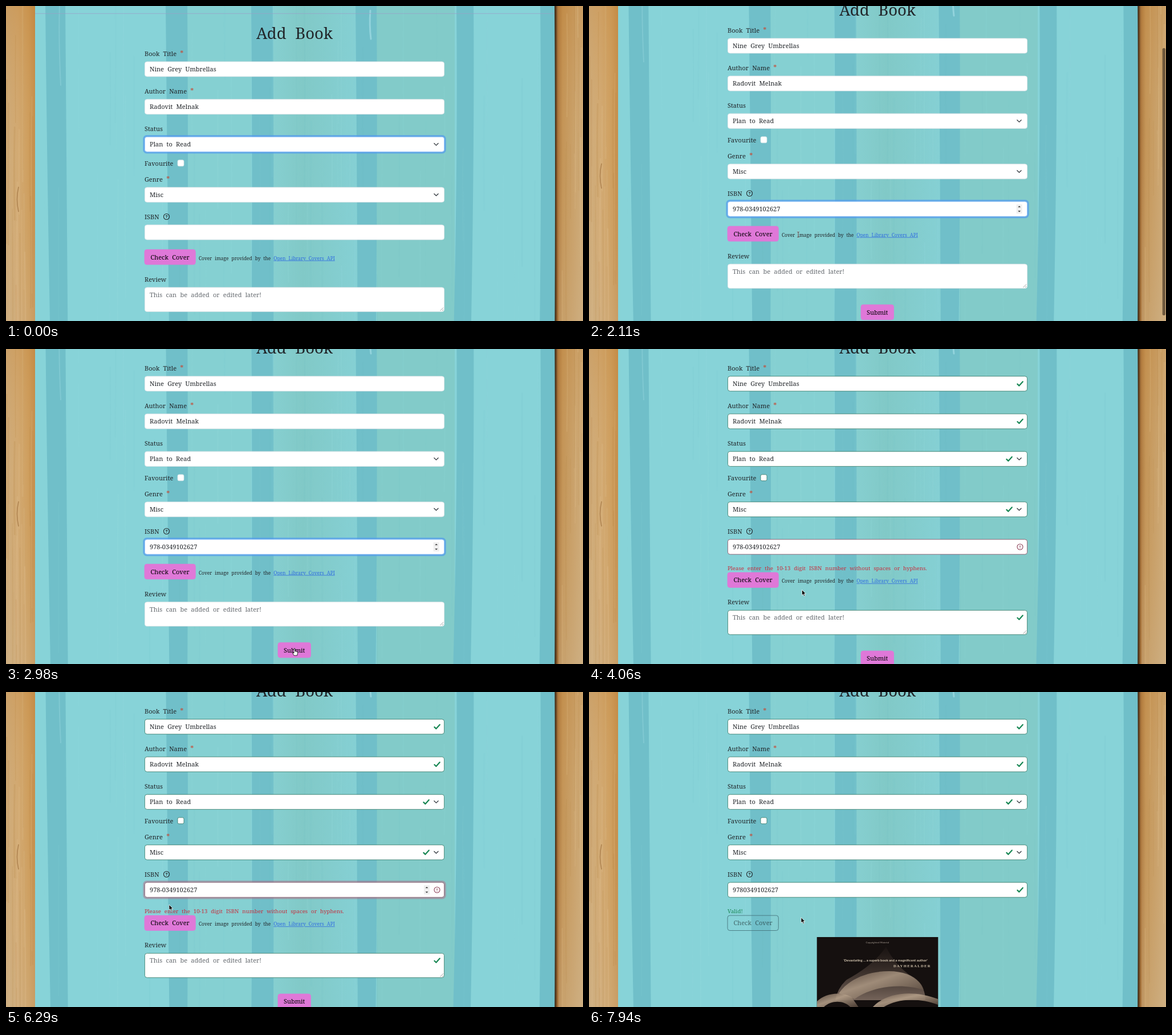
Animation of 1012x554 px, one loop 8000 ms. Source, as an HTML page:

```html
<!DOCTYPE html>
<html lang="en">
<head>
<meta charset="utf-8">
<title>Add Book</title>
<style>
  html, body { margin: 0; height: 100%; overflow: hidden; }
  svg { display: block; width: 100vw; height: 100vh; }
  text { font: 11px "Noto Serif", serif; word-spacing: .31em; fill: #212529; white-space: pre; }
  .title { font-size: 27.5px; }
  .button { font-weight: 500; fill: #000; }
  .message { font-size: 9.66px; word-spacing: .35em; }
  .caption { font-size: 8.36px; word-spacing: .35em; }
  .middle { text-anchor: middle; }
</style>
</head>
<body>
<svg viewBox="0 0 1012 554" xmlns="http://www.w3.org/2000/svg">
  <defs>
    <linearGradient id="woodLeft">
      <stop offset="0" stop-color="#cfae7e"/><stop offset=".4" stop-color="#d3ab74"/>
      <stop offset=".75" stop-color="#cf9f5e"/><stop offset="1" stop-color="#c48c48"/>
    </linearGradient>
    <linearGradient id="woodRight">
      <stop offset="0" stop-color="#2b1a0e"/><stop offset=".06" stop-color="#553619"/>
      <stop offset=".13" stop-color="#a8733a"/><stop offset=".3" stop-color="#c39456"/>
      <stop offset="1" stop-color="#cfae7e"/>
    </linearGradient>
    <linearGradient id="woodLight" x2="0" y2="1">
      <stop offset="0" stop-color="#c07e30" stop-opacity=".35"/>
      <stop offset=".4" stop-color="#cda066" stop-opacity=".1"/>
      <stop offset="1" stop-color="#cdb48e" stop-opacity=".5"/>
    </linearGradient>
    <linearGradient id="panel">
      <stop offset="0" stop-color="#86cfd0"/><stop offset=".35" stop-color="#81c9c7"/>
      <stop offset="1" stop-color="#85d0d4"/>
    </linearGradient>
    <linearGradient id="beam" x2="0" y2="1">
      <stop offset="0" stop-color="#4a3b33" stop-opacity=".1"/><stop offset="1" stop-color="#75645a"/>
    </linearGradient>
    <linearGradient id="fold" x2="1" y2="1">
      <stop offset="0" stop-color="#5c4b40"/><stop offset=".4" stop-color="#b39e88"/>
      <stop offset="1" stop-color="#46382f"/>
    </linearGradient>
  </defs>
  <g id="backdrop"></g>
  <g id="form"></g>
  <g id="overlay"></g>
</svg>
<script>
const LOOP = 8000;
const LEFT = 243, WIDTH = 526, ROW = 27;
const GREEN = '#198754', PINK = '#df78d8';
const [backdrop, form, overlay] = ['backdrop', 'form', 'overlay'].map(id => document.getElementById(id));

const text = (x, y, content, attrs = '') => `<text x="${x}" y="${y}" ${attrs}>${content}</text>`;
const rect = (x, y, w, h, attrs) => `<rect x="${x}" y="${y}" width="${w}" height="${h}" ${attrs}/>`;
const path = (d, attrs) => `<path d="${d}" ${attrs}/>`;
const line = (d, color, width, extra = '') =>
  path(d, `fill="none" stroke="${color}" stroke-width="${width}" ${extra}`);
const at = (x, y, content) => `<g transform="translate(${x} ${y})">${content}</g>`;
const within = (t, ...spans) => spans.some(([from, to]) => t >= from && t < to);

// Keys are [time, ...values]; values are interpolated linearly or held.
function track(t, keys) {
  const next = keys.findIndex(key => key[0] > t);
  if (next < 1) return keys.at(next ? -1 : 0).slice(1);
  const a = keys[next - 1], b = keys[next], k = (t - a[0]) / (b[0] - a[0]);
  return a.slice(1).map((v, i) => v + (b[i + 1] - v) * k);
}
const ramp = (t, ...keys) => track(t, keys)[0];
const held = (t, ...keys) => keys.filter(key => key[0] <= t).at(-1)[1];

function random(seed) {
  return () => (seed = (seed * 16807) % 2147483647) / 2147483647;
}

function paintBackdrop() {
  const rnd = random(71);
  const streaks = (count, x, w, color, strength) => Array.from({ length: count }, () => {
    const sx = x + rnd() * w, y = rnd() * 560 - 60, h = 80 + rnd() * 320, bend = rnd() * 5 - 2.5;
    return line(`M${sx} ${y}q${bend} ${h / 2} 0 ${h}`, color, .6 + rnd() * 2.4,
      `opacity="${strength * (.4 + rnd() * .6)}" stroke-linecap="round"`);
  }).join('');
  const stripe = (a, b, c, d) =>
    path(`M${a} -5H${b}Q${b + 2} 260 ${d} 660H${c}Q${a + 3} 300 ${a} -5Z`, 'fill="#70bfc9"');
  backdrop.innerHTML =
    rect(0, -5, 52, 665, 'fill="url(#woodLeft)"') +
    rect(0, -5, 52, 665, 'fill="url(#woodLight)"') +
    streaks(12, 1, 46, '#b27c38', .2) + streaks(10, 2, 46, '#e3c596', .3) +
    line('M22 318q-5 22 0 44', '#83521f', 1.6, 'opacity=".45"') +
    rect(961, -5, 51, 665, 'fill="url(#woodRight)"') +
    rect(969, -5, 43, 665, 'fill="url(#woodLight)"') +
    streaks(9, 974, 36, '#e0c08f', .3) + streaks(6, 974, 36, '#b58649', .18) +
    rect(51, -5, 910.5, 665, 'fill="#87d3d8"') +
    rect(318, -5, 112, 665, 'fill="#85d0d2"') +
    rect(469, -5, 148, 665, 'fill="url(#panel)"') +
    rect(650, -5, 137, 665, 'fill="#82cbc9"') +
    [[69, 104, 79, 109], [280, 318, 287, 318], [430, 468, 430, 469],
     [613, 650, 617, 648], [790, 820, 783, 814], [937, 962, 935, 962]].map(s => stripe(...s)).join('') +
    streaks(40, 55, 900, '#9cdde0', .15) + streaks(25, 55, 900, '#62b3bf', .1) +
    line('M94 -5Q92 60 96 140', '#98d8de', 2, 'opacity=".4"') +
    line('M639 8q-2 25 1 50', '#a9e1ea', 3, 'opacity=".6" stroke-linecap="round"') +
    line('M51 13.2H961', '#9a9fc8', 1.1, 'opacity=".75"');
}

const check = (x, y) =>
  at(x, y, line('M-4.6 .6L-1.6 3.6L4.8 -3.6', GREEN, 2.2, 'stroke-linecap="round" stroke-linejoin="round"'));
const chevron = y =>
  at(754.5, y, line('M-3.6 -1.8L0 1.8L3.6 -1.8', '#343a40', 1.3, 'stroke-linecap="round" stroke-linejoin="round"'));
const spinner = (x, y) => at(x, y,
  rect(-5, -8, 10, 16, 'fill="#efefef"') + path('M-2.4 -3L0 -5.6L2.4 -3ZM-2.4 3L0 5.6L2.4 3Z', 'fill="#444"'));
const alertIcon = y => at(756, y,
  '<circle r="5" fill="none" stroke="#8a3d55" stroke-width="1.1"/>' +
  line('M0 -2.6V.6M0 1.7V2.8', '#8a3d55', 1.2));

const label = (y, name, required) =>
  text(LEFT, y, name + (required ? ' <tspan fill="#c9452f" font-size="12">*</tspan>' : ''));

// The border is drawn inside the box, the focus halo around it.
function box(y, h, border, glow = 0, glowColor = '#559cec', strength = .72) {
  const halo = glow > 0
    ? rect(LEFT - 1.2, y - 1.2, WIDTH + 2.4, h + 2.4,
        `rx="5" fill="none" stroke="${glowColor}" stroke-width="3" opacity="${glow * strength}"`)
    : '';
  return halo + rect(LEFT + .4, y + .4, WIDTH - .8, h - .8,
    `rx="4" fill="#fff" stroke="${border}" stroke-width=".8"`);
}

function button(x, y, w, name, fade = 0) {
  return rect(x, y, w, 26.5, `rx="4" fill="${PINK}" fill-opacity="${1 - fade}" stroke="${fade ? '#3f6b74' : PINK}" stroke-width=".8"`) +
    text(x + w / 2, y + 17.3, name, `class="button middle" opacity="${1 - fade * .5}"`);
}

function cover() {
  const fold = (d, opacity) => path(d, `fill="url(#fold)" opacity="${opacity}"`);
  return rect(399.7, 481, 212.6, 140, 'fill="#15100f"') +
    path('M521 498Q500 530 452 556Q436 570 432 592H590Q590 566 568 552Q536 530 521 498Z', 'fill="url(#beam)"') +
    fold('M438 580C456 554 490 541 526 541C560 541 582 556 587 574C550 562 500 566 466 590Z', .8) +
    fold('M400 606V594C414 580 440 576 460 586L474 606H460C450 592 424 590 410 606Z', .9) +
    fold('M496 606C518 580 564 572 612 590V600C576 586 536 590 514 606Z', .9) +
    text(506, 492, 'Copyrighted Material', 'class="middle" style="font:4.4px Lato,sans-serif;word-spacing:0;fill:#a79c92"') +
    text(520, 523.6, "'Devastating ... a superb book and a magnificent author'",
      'class="middle" style="font:bold 6px Lato,sans-serif;word-spacing:0;fill:#d6c8b2"') +
    text(534, 534.4, 'DAYHERALDER', 'style="font:bold 6.6px \'Liberation Serif\',serif;letter-spacing:1.35px;fill:#cfc0aa"');
}

function drawForm(t) {
  const submitted = t >= 3270, fixed = t >= 6490, loading = t >= 7540, loaded = t >= 7940;
  const border = submitted ? '#2f7562' : '#dee2e6';
  const shift = submitted ? 14.7 : 0;
  const lower = shift + (loading ? 24 : 0);

  const input = (y, value) =>
    box(y, ROW, border) + text(252, y + 17.5, value) + (submitted ? check(756, y + 13.5) : '');
  const select = (y, value, glow) =>
    box(y, ROW, glow > .3 ? '#86b7fe' : border, glow) + text(252, y + 17.5, value) +
    chevron(y + 13.5) + (submitted ? check(737, y + 13.5) : '');

  let out =
    text(506, 57.5, 'Add Book', 'class="title middle"') +
    label(88, 'Book Title', true) + input(97.5, 'Nine Grey Umbrellas') +
    label(154, 'Author Name', true) + input(163.7, 'Radovit Melnak') +
    label(220, 'Status') + select(229.8, 'Plan to Read', ramp(t, [800, 1], [940, 0])) +
    label(280.5, 'Favourite') +
    rect(301, 270.8, 11, 11, `rx="2.5" fill="#fff" stroke="${submitted ? '#2f7562' : '#cfe0e2'}" stroke-width=".8"`) +
    label(309, 'Genre', true) + select(318.5, 'Misc', 0) +
    label(375, 'ISBN') +
    '<circle cx="281.5" cy="370.5" r="5" fill="none" stroke="#212529" stroke-width="1.1"/>' +
    text(281.5, 373.4, '?', 'class="middle" style="font:bold 8px Roboto,sans-serif"');

  // ISBN row
  const focus = ramp(t, [1140, 0], [1320, 1], [3270, 1], [3400, 0], [5320, 0], [5500, 1], [7180, 1], [7330, 0]);
  const glowColor = !submitted ? '#559cec' : fixed ? '#3f9a78' : '#b5647f';
  const isbnBorder = !submitted ? (focus > .3 ? '#86b7fe' : border) : fixed ? border : '#8a4a5e';
  const isbn = fixed ? '9780349102627' : t >= 1420 ? '978-0349102627' : '';
  out += box(384.5, ROW, isbnBorder, focus, glowColor, submitted ? .45 : .72) + text(252, 402, isbn);
  if (submitted) out += fixed ? check(756, 398) : alertIcon(398);
  if (focus > .5 || within(t, [4560, 5320])) out += spinner(submitted ? 738 : 754.7, 398);
  if (within(t, [1230, 2010], [2500, 2980], [5320, 5790], [6000, 6290], [6490, 6980])) {
    const caret = fixed ? 270.7 : submitted ? 274.2 : t < 1420 ? 252.4 : 335.4;
    out += line(`M${caret} 391.5v13`, '#111', .9);
  }
  if (submitted) {
    out += fixed
      ? text(LEFT, 439.2, 'Valid!', `class="message" style="fill:${GREEN}"`)
      : text(LEFT, 439.2, 'Please enter the 10-13 digit ISBN number without spaces or hyphens.',
          'class="message" style="fill:#c5303f"');
  }

  out += button(LEFT, 428.3 + shift, 89.3, 'Check Cover', ramp(t, [7540, 0], [7940, 1]));
  if (!loading) {
    out += text(338, 446.6 + shift, 'Cover image provided by the ' +
      '<tspan fill="#2f6be0" text-decoration="underline">Open Library Covers API</tspan>', 'class="caption"');
  }
  if (loaded) return out + cover();

  return out + at(0, lower,
    label(484.5, 'Review') + box(494.5, 43.5, border) +
    text(252, 511.7, 'This can be added or edited later!', 'style="fill:#666b70"') +
    line('M761.5 536L767 530.5M765 536L767 534', '#777', .7) +
    (submitted ? check(756, 507.5) : '') +
    button(477, 566.3, 57.5, 'Submit'));
}

const CURSOR_PATH = [
  [80, 330, 240], [850, 345, 405], [1140, 352, 404], [1500, 367, 402], [2300, 367, 402],
  [2500, 408, 430], [2980, 506, 527], [4059, 506, 527], [4060, 374, 424], [4160, 318, 377],
  [4460, 318, 377], [4560, 295, 364], [5220, 283, 350], [5320, 275, 348], [5700, 275, 348],
  [6000, 286, 374], [7080, 286, 374], [7180, 300, 402], [7540, 300, 402], [7640, 372, 396.5]
];

function cursor(t) {
  if (t < 80) return '';
  const [x, y] = track(t, CURSOR_PATH);
  const inField = t > 4000 && y > 334 && y < 362;
  const beam = 'M-1.8 -4.8Q0 -4.8 0 -3.6Q0 -4.8 1.8 -4.8M0 -3.6V3.6M-1.8 4.8Q0 4.8 0 3.6Q0 4.8 1.8 4.8';
  if (inField || within(t, [760, 2450])) {
    return at(x, y, line(beam, '#fff', 1.8, 'opacity=".7"') + line(beam, '#222', .9));
  }
  const onButton = within(t, [2900, 4060]) || (t > 7000 && x < 332 && y > 393);
  const shape = onButton
    ? 'M-1 0Q0 -1 1 0V4.5L5 5.5Q6 6 5.6 8L4.6 12H-.8L-3.6 7.8Q-3.6 6.4 -1 8Z'
    : 'M0 0V9.6L2.2 7.6L3.8 11.2L5.4 10.5L3.9 7H6.9Z';
  return at(x, y, path(shape, `fill="${onButton ? '#fff' : '#000'}" stroke="${onButton ? '#000' : '#fff'}" stroke-width=".8"`));
}

function drawOverlay(t, scroll) {
  const bar = t < 2010 ? 0 : ramp(t, [2700, .85], [2980, 0]);
  return (scroll > 50 ? rect(0, 604 - scroll, 1012, 2, 'fill="#fff"') : '') +
    rect(1005.7, 41.2 + scroll * .8, 5.2, 470, `rx="2.6" fill="#5f4a33" opacity="${bar}"`) + cursor(t);
}

function render(now) {
  const t = now % LOOP;
  const scroll = held(t, [0, 0], [2010, 20], [2110, 41], [2210, 48], [2300, 51], [2600, 50]);
  for (const layer of [backdrop, form]) layer.setAttribute('transform', `translate(0 ${-scroll})`);
  form.innerHTML = drawForm(t);
  overlay.innerHTML = drawOverlay(t, scroll);
}

paintBackdrop();
const start = performance.now();
(function tick() {
  render(performance.now() - start);
  requestAnimationFrame(tick);
})();
</script>
</body>
</html>
```
